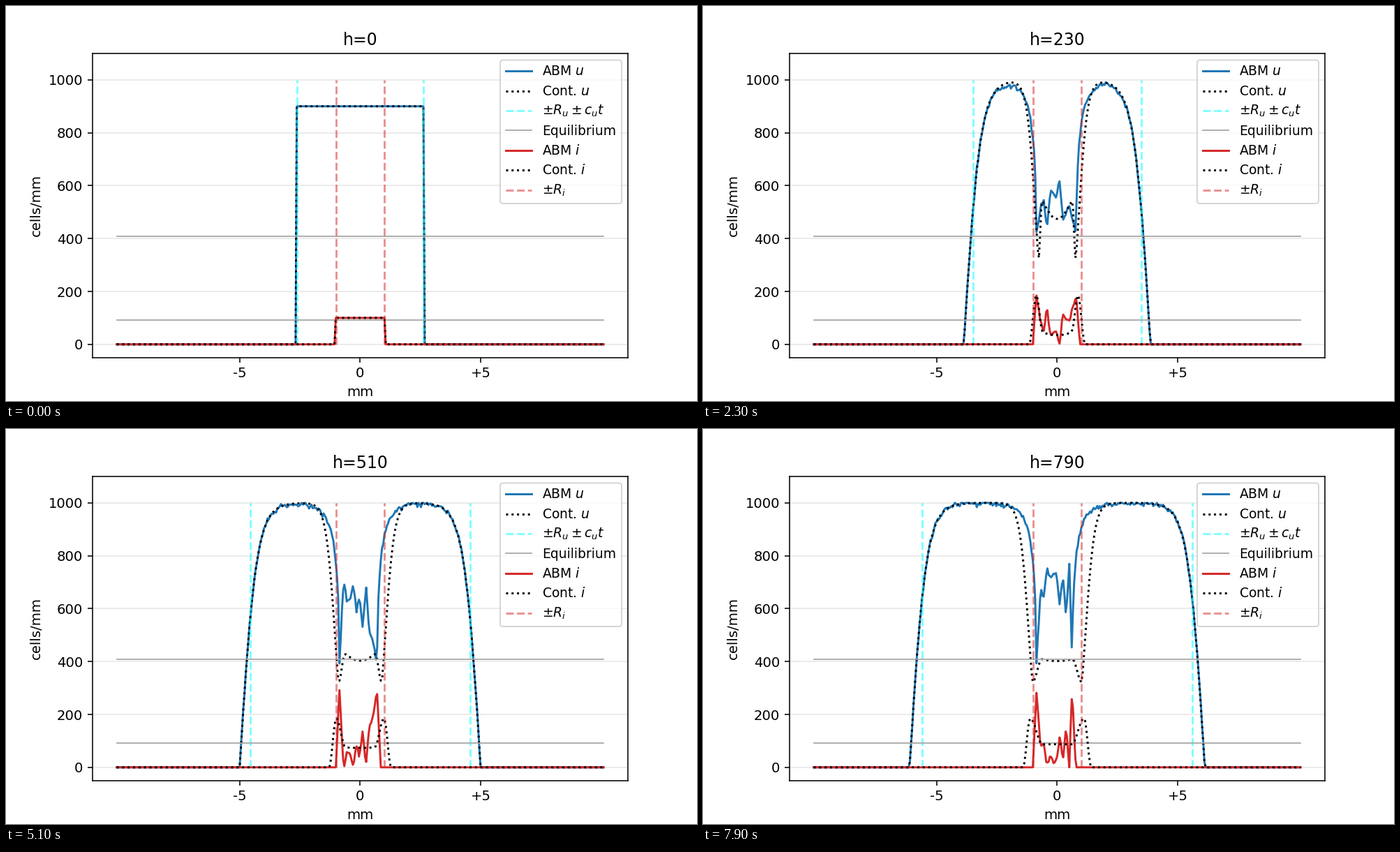
Recreate the animation shown at these times as a matplotlib script. Size 990 by 566 pixels, loop 8 s.

```python
import numpy as np
import matplotlib.pyplot as plt
from matplotlib.animation import FuncAnimation
from matplotlib.lines import Line2D
from matplotlib.patches import FancyBboxPatch
from matplotlib.transforms import Affine2D

W, H, DPI = 990, 566, 990 / 7
FRAMES, STEP = 80, 100
K, U_EQ, I_EQ, RATE = 1000, 408, 91, 0.183
R_U, R_I, SPEED = 2.6, 1, 0.0374
LAG = 3.5
x = np.linspace(-10, 10, 401)
r = np.abs(x)


def ease(a, b, v):
    return (1 - np.cos(np.pi * np.clip((v - a) / (b - a), 0, 1))) / 2


def mix(a, b, p):
    return a + (b - a) * p


def well_mixed(count):
    """Damped uninfected/infected oscillation at the centre, one row per frame."""
    beta = (1 - (U_EQ + I_EQ) / K) / I_EQ
    rest = np.array([U_EQ, I_EQ])

    def slope(s):
        u, i = s
        return np.array([u * (1 - (u + i) / K) - beta * u * i,
                         beta * i * (u - U_EQ)])

    n = 10
    dt = RATE / n
    s, rows = np.array([900.0, 100.0]), []
    for t in range(count):
        # spatial mixing damps the later swings a little more
        rows.append(mix(rest, s, np.exp(-0.012 * max(t - 30, 0))))
        for _ in range(n):
            a = slope(s)
            b = slope(s + a * dt / 2)
            c = slope(s + b * dt / 2)
            s = s + dt / 6 * (a + 2 * b + 2 * c + slope(s + c * dt))
    return np.array(rows)


CLOCK = np.arange(FRAMES + 6)
CENTRE = well_mixed(len(CLOCK))
ROUGH = np.random.default_rng(4).normal(size=(FRAMES // 8 + 2, 10))


def front(t):
    """Outer edge: spreads quickly at first, then travels at a steady speed."""
    limit = R_U + 0.05 + 0.0398 * t + 0.27 * (1 - np.exp(-t / 4))
    width = 0.012 + 0.67 * (1 - np.exp(-t / 5))
    return np.tanh(np.clip(limit - r, 0, None) / width)


def capacity(t):
    return K - 100 * np.exp(-RATE * t)


def continuum(t):
    limit = 1.05 + 0.0045 * t
    ridge = limit - 0.05 - 0.25 * (1 - np.exp(-t / 3))
    dip = ridge - 0.09 * (1 - np.exp(-t / 3))

    # the oscillation runs slightly ahead towards the rim
    ahead = t + LAG * ease(14, 24, t) * np.clip(r / 0.62, 0, 1) ** 2
    u, i = (np.interp(ahead, CLOCK, col) for col in CENTRE.T)
    u_dip = mix(CENTRE[t, 0], 322, ease(12, 22, t))
    i_top = mix(CENTRE[t, 1], 185, ease(5, 18, t))

    u = mix(u, u_dip, ease(0.62, dip, r))
    width = mix(0.38, 0.45, ease(14, 31, t))
    rise = np.tanh((np.clip(r - dip, 0, None) / width) ** 1.15)
    u = mix(u, capacity(t), rise) * front(t)
    i = mix(i, i_top, ease(0.6, ridge, r)) * (1 - ease(ridge, limit, r))
    return u, i


def agents(t):
    rng = np.random.default_rng(t)
    u0, i0 = CENTRE[t]
    early = np.exp(-t / 4)
    left = 0.85 + 0.15 * early
    right = left - 0.003 * t
    reach = 0.15 - 0.1 * early
    nodes = [-left, *np.linspace(-0.68, 0.5, ROUGH.shape[1]), right]

    # drifting roughness; infected cells are scarce where others crowd
    k, part = divmod(t / 8, 1)
    rough = mix(ROUGH[int(k)], ROUGH[int(k) + 1], part)
    rough = min(1, t / 20) * (80 * rough + rng.normal(0, 15, rough.size))
    u_mid = mix(u0, 500 + 2.2 * t, ease(8, 28, t)) + rough
    i_mid = np.clip(mix(i0, 70, ease(8, 28, t)) - 0.8 * rough, 0, None)
    u_dip = mix(u0, 400, ease(12, 28, t))
    i_top = mix(i0, 290, np.clip((t - 5) / 30, 0, 1))

    u = np.interp(x, nodes, [u_dip, *u_mid, u_dip])
    gap = np.clip(r - np.where(x < 0, left, right), 0, None)
    rise = 1 - np.exp(-(gap / 0.15) ** 0.66)
    u = mix(u, capacity(t), rise) * front(t)
    i = np.interp(x, [-left - reach, *nodes, right + reach],
                  [0, i_top, *i_mid, i_top, 0])

    grain = rng.normal(0, 5 * min(1, t / 6), (2, x.size))
    u = u + grain[0] * (u > 30)
    i = i + grain[1] * (i > 5)
    return np.clip(u, 0, K), np.clip(i, 0, None)


plt.rcParams["font.family"] = "DejaVu Sans"
fig, ax = plt.subplots(figsize=((W + 0.01) / DPI, (H + 0.01) / DPI), dpi=DPI)
fig.subplots_adjust(left=0.125, right=0.9, bottom=0.11, top=0.88)
ax.set(xlim=(-11, 11), ylim=(-50, 1100), xlabel="mm", ylabel="cells/mm")
ax.set_xticks([-4.95, 0, 4.95], ["-5", "0", "+5"])
ax.set_yticks(range(0, 1001, 200))
ax.grid(axis="y", color="0.9")
ax.set_axisbelow(True)
title = ax.set_title("h=0")

BLUE = dict(color="tab:blue")
RED = dict(color="tab:red")
DOTS = dict(color="k", ls=":")
CYAN = dict(color="cyan", ls="--", alpha=0.5)
PINK = dict(color="tab:red", ls="--", alpha=0.5)
GREY = dict(color="0.65", lw=0.9)

abm_u, = ax.plot(x, 0 * x, **BLUE)
cont_u, = ax.plot(x, 0 * x, **DOTS)
edges = [ax.plot([0, 0], [0, K], **CYAN)[0] for _ in range(2)]
for level in (U_EQ, I_EQ):
    ax.plot([-10, 10], [level, level], **GREY)
abm_i, = ax.plot(x, 0 * x, **RED)
cont_i, = ax.plot(x, 0 * x, **DOTS)
for pos in (-R_I, R_I):
    ax.plot([pos, pos], [0, K], **PINK)


def legend(rows):
    pix = Affine2D().scale(1 / W, -1 / H).translate(0, 1) + fig.transFigure
    fig.add_artist(FancyBboxPatch(
        (708, 77.5), 174, 205.5, boxstyle="round,pad=0,rounding_size=3.8",
        fc="white", ec="0.8", alpha=0.8, lw=1, transform=pix, zorder=4))
    for k, (label, style) in enumerate(rows):
        y = 93.2 + 28.4 * k
        fig.add_artist(Line2D([715.7, 753.2], [y, y], transform=pix,
                              zorder=5, **style))
        fig.text(768.2, y + 6.1, label, transform=pix, fontsize=9.57,
                 va="baseline", zorder=6)


legend([("ABM $u$", BLUE), ("Cont. $u$", DOTS),
        (r"$\pm R_u \pm c_u t$", CYAN), ("Equilibrium", GREY),
        ("ABM $i$", RED), ("Cont. $i$", DOTS), (r"$\pm R_i$", PINK)])


def update(t):
    title.set_text(f"h={10 * t}")
    for lines, data in (((abm_u, abm_i), agents(t)),
                        ((cont_u, cont_i), continuum(t))):
        for line, y in zip(lines, data):
            line.set_ydata(y)
    reach = R_U + SPEED * t
    for line, pos in zip(edges, (-reach, reach)):
        line.set_xdata([pos, pos])
    return []


anim = FuncAnimation(fig, update, frames=FRAMES, interval=STEP,
                     init_func=lambda: update(0), repeat=True, repeat_delay=0)
plt.show()
```
